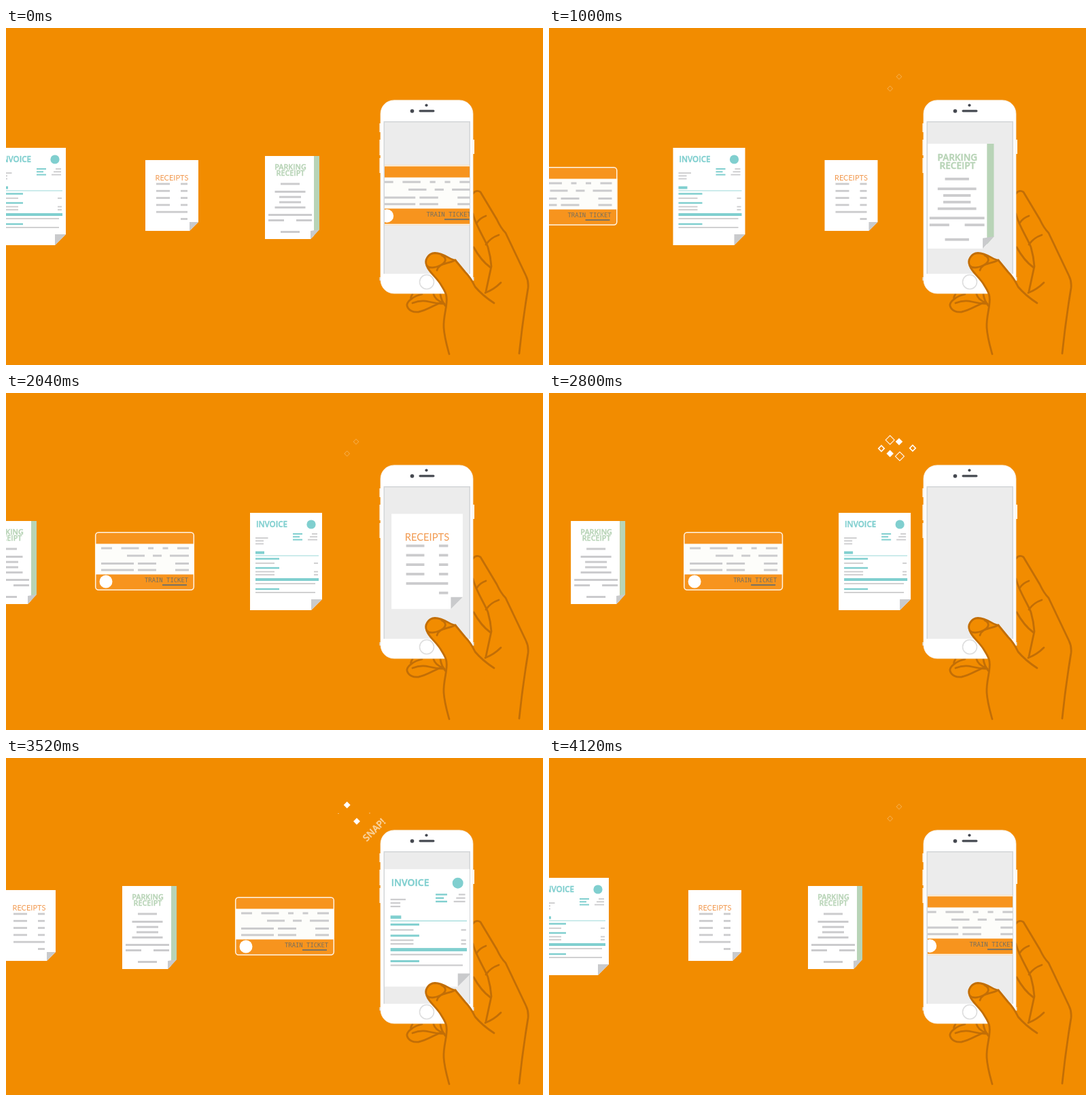
Animation, 790 px wide and 495 px high, one loop 4320 ms. Source, as an HTML page:

```html
<!DOCTYPE html>
<html lang="en">
<head>
<meta charset="utf-8">
<title>Snap your receipts</title>
<style>
html, body { margin: 0; width: 100%; height: 100%; overflow: hidden; background: #f28c00; }
svg { display: block; }
.line { fill: none; stroke: #c26e06; stroke-width: 2.8; stroke-linecap: round; stroke-linejoin: round; }
.bold { font-family: "Open Sans", sans-serif; font-weight: 600; stroke-width: .4; }
</style>
</head>
<body>
<svg width="790" height="495" viewBox="0 0 790 495">
  <defs id="docs"></defs>
  <clipPath id="beltClip"><rect width="553" height="495"/></clipPath>
  <clipPath id="screenClip"><rect x="557" y="138" width="125" height="223"/></clipPath>

  <g id="belt" clip-path="url(#beltClip)"></g>

  <g class="line">
    <path d="M687 243Q692 237 698 241L722 281Q728 294 735 301L765 364Q769 372 768 382Q760 430 755 478"/>
    <path d="M687 273C691 290 705 311 709 322Q713 336 714 350L706 387"/>
    <path d="M688 322Q699 342 713 352M692 287Q697 279 706 276M706 318Q713 308 725 304M705 389Q718 384 728 374"/>
    <path d="M612 391C599 394 589 402 590 408C592 415 599 418 607 417C619 415 629 407 641 403"/>
    <path d="M598 391Q595 395 596 398M598 404Q611 399 622 402T645 405M629 391Q631 399 643 404M639 391Q640 401 648 410"/>
  </g>

  <g fill="#fff">
    <path d="M549.5 140h4v13h-4zM549.5 164h4v23h-4zM549.5 191h4v22h-4zM685 164h4v21h-4z"/>
    <path fill="#dde0e2" d="M549.5 366h139v5h-139z"/>
    <rect x="551" y="106" width="136" height="284" rx="20" stroke="#f6ead9" stroke-width=".8"/>
  </g>
  <rect x="555.5" y="137" width="127.5" height="224" fill="#d3d6d8"/>
  <rect x="557" y="138.5" width="124.5" height="222.5" fill="#ececec"/>
  <g fill="#454950">
    <circle cx="618.5" cy="113.5" r="2.1"/>
    <circle cx="597.5" cy="122" r="2.8"/>
    <rect x="607.5" y="120.2" width="23" height="3.2" rx="1.6"/>
  </g>
  <circle cx="619" cy="373" r="10.5" fill="none" stroke="#dedede" stroke-width="1.6"/>
  <g clip-path="url(#screenClip)"><use id="shown"/><use id="incoming"/></g>

  <g id="thumb" class="line">
    <path style="fill:#f28c00" d="M718 404Q701 393 690 380Q684 367 675 358L661 341C654 341 645 331 631 330.5C621 331 615 341 619 349C622 359 634 366 641 379Q648 390 648 395C650 408 643 422 644 440C645 455 649 468 652 479"/>
    <path d="M619 349C623 354 635 352 643 346C649 341 646 336 641 334M634 356C637 345 649 347 661 341"/>
  </g>

  <g id="sparks" fill="#fff" fill-rule="evenodd"><path/><path/><path/></g>
  <text id="snap" class="bold" font-size="14" fill="#fff" stroke="#fff" text-anchor="middle"
        transform="translate(545 109) rotate(-45)">SNAP!</text>
</svg>
<script>
const $ = id => document.getElementById(id);
const clamp = v => Math.max(0, Math.min(1, v));
const ramp = (t, a, b) => clamp((t - a) / (b - a));
const loop = (n, make) => Array.from({ length: n }, (_, i) => make(i)).join('');
const GREY = '#cbcbcd', TEAL = '#80cfcf', GREEN = '#b8d4b7', ORANGE = '#f7941e';

const bar = (x, y, w, h = 3, color = GREY) =>
  `<rect x="${x}" y="${y - h / 2}" width="${w}" height="${h}" fill="${color}"/>`;
// Bars of the given widths, justified between two edges.
const spread = (left, right, y, h, ...widths) => {
  const gap = (right - left - widths.reduce((a, b) => a + b)) / (widths.length - 1 || 1);
  let x = left - gap;
  return widths.map(w => {
    const part = bar(x += gap, y, w, h);
    x += w;
    return part;
  }).join('');
};
const label = (x, y, size, color, text) =>
  `<text class="bold" x="${x}" y="${y}" font-size="${size}" fill="${color}" stroke="${color}" text-anchor="middle">${text}</text>`;
const sheet = (w, h, fold) =>
  `<path fill="#fff" d="M0 0H${w}V${h - fold}L${w - fold} ${h}H0z"/>
  <path fill="#c9cacc" d="M${w} ${h - fold}h${-fold}v${fold}z"/>`;

const ticket = `<rect width="146" height="86" rx="5" fill="${ORANGE}"/>
  <path fill="#fdfdfa" d="M0 17.5H146V62.5H0z"/>
  <rect x=".7" y=".7" width="144.6" height="84.6" rx="4.5" fill="none" stroke="#fff5e6" stroke-width="1.5"/>
  <circle cx="16" cy="73" r="9.5" fill="#fff"/>
  <text x="73" y="74" font-size="8.9" fill="#77705f" font-family="DejaVu Sans Mono, monospace">TRAIN TICKET</text>` +
  bar(99, 78, 36, 2, '#7b7363') +
  spread(9, 138, 24, 3, 16, 26, 8, 8, 17) + spread(47, 138, 35, 3, 26, 13, 28) +
  loop(2, i => spread(9, 90, 46.5 + 9.5 * i, 3, 48, 27) + bar(118, 46.5 + 9.5 * i, 20));

const parking = `<path fill="#fff" d="M0 0H72V117L67 122H0z"/>
  <path fill="${GREEN}" d="M72 0H80V108L72 117z"/><path fill="#c9cacc" d="M67 122V110L80 108z"/>` +
  label(37.5, 20, 10.8, GREEN, 'PARKING') + label(37.5, 29.3, 10.8, GREEN, 'RECEIPT') +
  loop(2, i => bar(23, 41 + 70.5 * i, 28)) +
  loop(4, i => {
    const w = i % 3 ? 32 : 45;
    return bar(37 - w / 2, 52.5 + 7.7 * i, w);
  }) +
  bar(5, 86.5, 64) + spread(5, 69, 94.5, 3, 23, 23);

const receipts = sheet(78, 104, 13) +
  `<text x="39" y="29.5" font-size="11" fill="#f29a50" text-anchor="middle" font-family="Lato, sans-serif">RECEIPTS</text>` +
  loop(6, i => spread(16, 62, 35 + 10.3 * i, 2.8, ...(i < 4 ? [20, 10] : i < 5 ? [46] : [0, 10])));

const invoice = sheet(106, 143, 16) + label(32, 21, 11.6, TEAL, 'INVOICE') +
  `<circle cx="90" cy="17" r="6.6" fill="${TEAL}"/>` +
  loop(3, i => {
    const y = 31 + 4.25 * i, w = 8 + 3 * i;
    return bar(63, y, i % 2 ? 10 : 14, 2, TEAL) + bar(99 - w, y, w, 1.8) + bar(8, y + 6, i ? 12 : 18.5, 1.8);
  }) +
  bar(8, 58.5, 13, 4, TEAL) + bar(8, 63, 93, .8, TEAL) + bar(8, 98, 93, 4, TEAL) +
  [67.5, 81, 112].map(y => bar(8, y, 35, 2.5, TEAL)).join('') +
  [74, 86.5, 91].map(y => spread(8, 100, y, 1.8, 28, 6)).join('') +
  [104, 117].map(y => bar(8, y, 88, 1.8)).join('');

// x, y: belt centre at the start; px, py, zoom: rest on the screen; stop: belt shift at rest.
const docs = [
  { art: ticket, w: 146, h: 86, x: 620, y: 247, px: 618.5, py: 245.5, zoom: 1.017, stop: 0 },
  { art: parking, w: 80, h: 122, x: 421, y: 249, px: 604, py: 247, zoom: 1.262, stop: 200.5 },
  { art: receipts, w: 78, h: 104, x: 244, y: 246, px: 619.5, py: 247.3, zoom: 1.343, stop: 377 },
  { art: invoice, w: 106, h: 143, x: 35, y: 247.5, px: 620, py: 249.5, zoom: 1.208, stop: 583 }
];
$('docs').innerHTML = docs.map((d, i) =>
  `<g id="doc${i}"><g transform="translate(${-d.w / 2} ${-d.h / 2})">${d.art}</g></g>`).join('');
$('belt').innerHTML = docs.map((d, i) => `<use href="#doc${i}"/>`).join('');

const LOOP = 4320, LAST = 4120, CYCLE = 1040, SPAN = 793;
// Pairs of diamonds: start time, radius, two centres.
const sparks = [
  [340, 9, 501.7, 69, 516, 93],
  [390, 6.3, 489, 81.5, 535, 81],
  [590, 5.3, 501.7, 89, 515, 71.5]
];
const diamond = (x, y, r) => `M${x - r} ${y}l${r} ${-r} ${r} ${r} ${-r} ${r}z`;

function drawSparks(phase) {
  sparks.forEach(([start, size, x1, y1, x2, y2], i) => {
    const age = phase - start, open = ramp(age, 280, 350);
    const r = size * ramp(age, 0, 110) * (1 - .2 * open), hole = r * .8 * open;
    const path = $('sparks').children[i];
    path.setAttribute('d', [r, hole].map(s => diamond(x1, y1, s) + diamond(x2, y2, s)).join(''));
    path.setAttribute('opacity', 1 - ramp(age, 385, 430));
  });
  $('snap').setAttribute('opacity', ramp(phase, 340, 440) * (1 - ramp(phase, 560, 630)));
}

function putOnScreen(id, i, dx, alpha) {
  const d = docs[i], el = $(id);
  el.setAttribute('href', '#doc' + i);
  el.setAttribute('transform', `translate(${d.px + dx} ${d.py}) scale(${d.zoom})`);
  el.setAttribute('opacity', alpha);
}

function draw(now) {
  const t = Math.min(now % LOOP, LAST);
  const k = Math.floor(t / CYCLE), phase = t - k * CYCLE, next = (k + 1) % docs.length;
  const from = docs[k].stop, to = docs[next].stop || SPAN;
  const move = Math.sin(ramp(phase, 545, 1000) * Math.PI / 2) ** 2;
  const shift = from + (to - from) * move;

  docs.forEach((d, i) => {
    const x = (d.x + shift + 120) % SPAN - 120, el = $('belt').children[i];
    el.setAttribute('transform', `translate(${x} ${d.y})`);
    el.setAttribute('opacity', 1 - ramp(x, 585, 612));
  });
  putOnScreen('shown', k, 0, 1 - ramp(phase, 450, 570));
  putOnScreen('incoming', next, shift - to, move > 0 ? 1 : 0);

  // The thumb leans onto the button; its wrist end stays put.
  const press = Math.sin(ramp(phase, 0, 380) * Math.PI) ** 2;
  $('thumb').setAttribute('transform',
    `translate(0 479) matrix(1 0 ${.07 * press} ${1 - .085 * press} 0 0) translate(0 -479)`);
  drawSparks(phase);
}

const begin = performance.now();
(function frame() {
  draw(performance.now() - begin);
  requestAnimationFrame(frame);
})();
</script>
</body>
</html>
```
